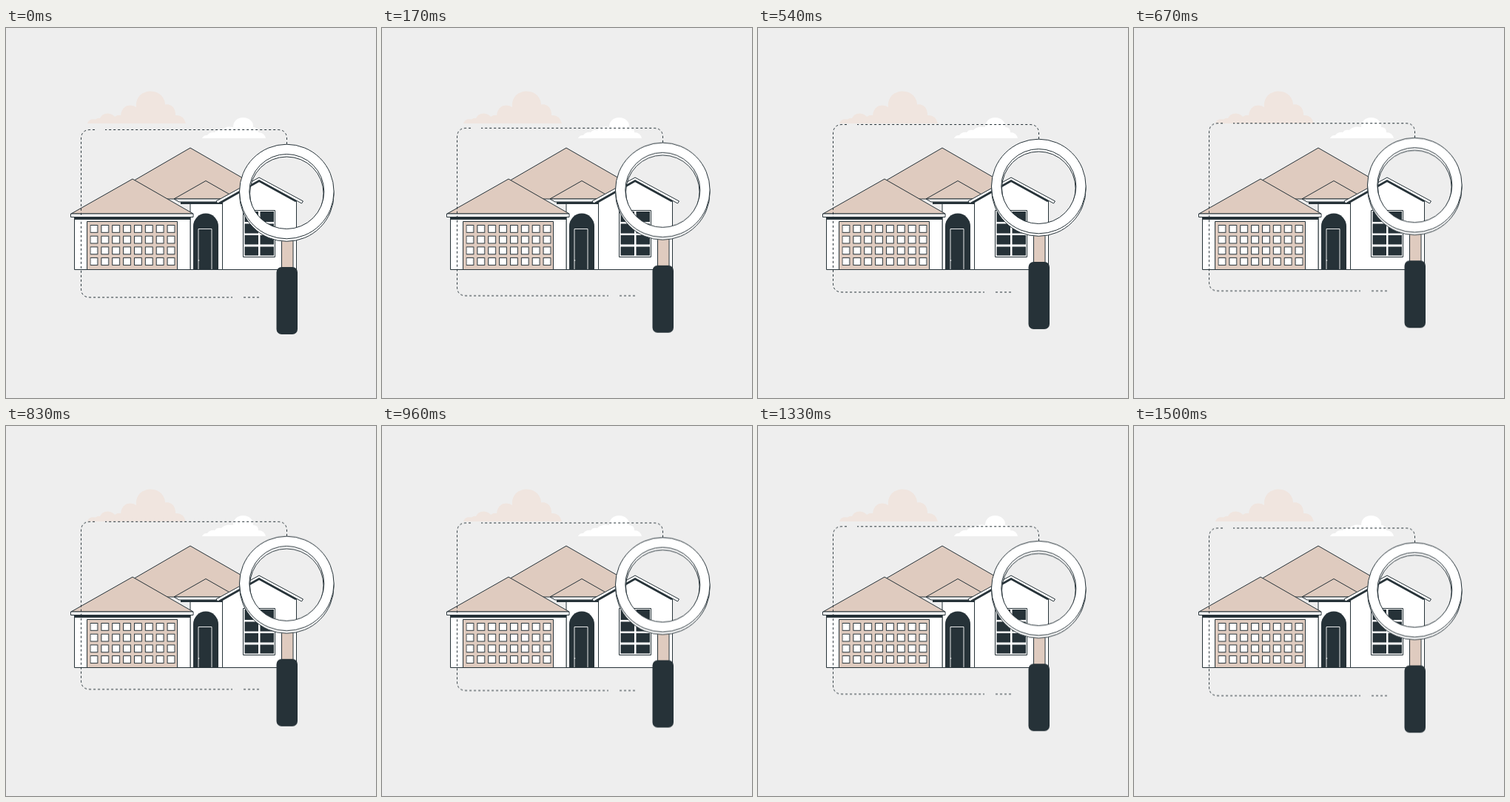
An HTML page for the animation above (1540 ms loop, 500 by 500 pixels).

```html
<!DOCTYPE html>
<html lang="en">
<head>
<meta charset="utf-8">
<title>House search</title>
<style>
  html, body { margin: 0; width: 100%; height: 100%; overflow: hidden; background: #eee; }
  svg { display: block; width: 100%; height: 100%; }
  .line { stroke: #263238; stroke-width: 1; stroke-linejoin: round; }
  .white { fill: #fff; }
  .tan { fill: #dfcbbf; }
  .dark { fill: #263238; }
  .none { fill: none; }
  .float { animation: float 1540ms linear -40ms infinite; }
  @keyframes float {
    0%, 100% { transform: translateY(.5px); }
    50% { transform: translateY(-9.5px); }
  }
</style>
</head>
<body>
<svg viewBox="0 0 500 500">
  <defs>
    <pattern id="panes" x="113.5" y="266" width="14.87" height="14.7" patternUnits="userSpaceOnUse">
      <rect class="white line" x=".5" y=".5" width="9.8" height="9.8"/>
    </pattern>
  </defs>

  <!-- clouds -->
  <path fill="#f0e5df" d="M110 129Q112 122 121 123.5Q124 121 127 122Q130 115 138 115.5Q144 116 147 120Q151 117 155 118Q157 104.500 168 104.500Q173 104.500 176 107C175 93 184 85.500 196 85.500C207 85.500 215 94 215 103.500C224 102 229.500 109 229 118Q240 117 243 129Z"/>
  <path class="white" d="M265 149Q267 144.500 272 145Q276 140 282 141Q285 136.500 291 138Q296 132 307 134C307 126 313 121 320 121C329 121 335 127 334 134Q341 134 341 141Q349 141 351 149Z"/>

  <!-- main roof and entrance -->
  <path class="tan line" d="M249 162L130 231H369Z"/>
  <path class="white line" d="M249 236H293V326.500H249Z"/>
  <path class="tan line" d="M270 206.500L227 231H313Z"/>
  <path class="white line" d="M227 231H300V235H234Z"/>
  <path class="dark" d="M236 235H293V238H236Z"/>
  <path class="dark" d="M253 326.500V268A17 17.500 0 0 1 287 268V326.500Z"/>
  <path class="none" stroke="#fff" stroke-width=".9" d="M260 326V271.500H278V326"/>
  <circle class="white" cx="260.500" cy="314" r=".8"/>

  <!-- right wing -->
  <path class="white line" d="M292.500 326.500V233L342 205L392.500 233V326.500Z"/>
  <path class="none" stroke="#263238" stroke-width="3" d="M289 236.500L342 206.500L392 234"/>
  <path class="white line" d="M284 234L342 202L401.500 234L399.500 237L342 205.500L286 237Z"/>
  <rect class="white line" x="320.500" y="246.500" width="43" height="63"/>
  <g class="dark">
    <path d="M322.500 248H341V262H322.500ZM343.500 248H362V262H343.500Z"/>
    <path d="M322.500 264.500H341V277.500H322.500ZM343.500 264.500H362V277.500H343.500Z"/>
    <path d="M322.500 280H341V292.500H322.500ZM343.500 280H362V292.500H343.500Z"/>
    <path d="M322.500 295.500H341V307.500H322.500ZM343.500 295.500H362V307.500H343.500Z"/>
  </g>

  <!-- garage -->
  <rect class="white line" x="92.500" y="254" width="156.500" height="72.500"/>
  <path class="dark" d="M92.500 255H249V259H92.500Z"/>
  <path class="tan line" d="M171 204L88 251H253Z"/>
  <rect class="white line" x="87.500" y="251" width="165.500" height="4.500"/>
  <rect class="tan line" x="109.500" y="261.500" width="122" height="65"/>
  <rect x="113.500" y="266" width="118" height="58" fill="url(#panes)"/>

  <g class="float">
    <g class="none line" stroke-dasharray="3 3">
      <path d="M379.500 157V150Q379.500 137.500 367 137.500H134"/>
      <path d="M120 137.500H114Q101.500 137.500 101.500 150V352Q101.500 364 114 364H306"/>
      <path d="M321 364H343"/>
    </g>
    <rect class="tan line" x="372.500" y="286.500" width="15.500" height="40" rx="2"/>
    <rect class="dark" x="365.500" y="323" width="28.500" height="91" rx="7"/>
    <g class="white line" fill-rule="evenodd">
      <path d="M315.500 224.500a63.800 63.800 0 0 1 127.600 0a63.800 63.800 0 0 1 -127.600 0ZM329.500 223.800a49.800 49.800 0 0 0 99.600 0a49.800 49.800 0 0 0 -99.600 0Z"/>
      <path d="M315.500 221a63.800 63.800 0 0 1 127.600 0a63.800 63.800 0 0 1 -127.600 0ZM328.800 221a50.500 50.500 0 0 0 101 0a50.500 50.500 0 0 0 -101 0Z"/>
    </g>
  </g>
</svg>
</body>
</html>
```
